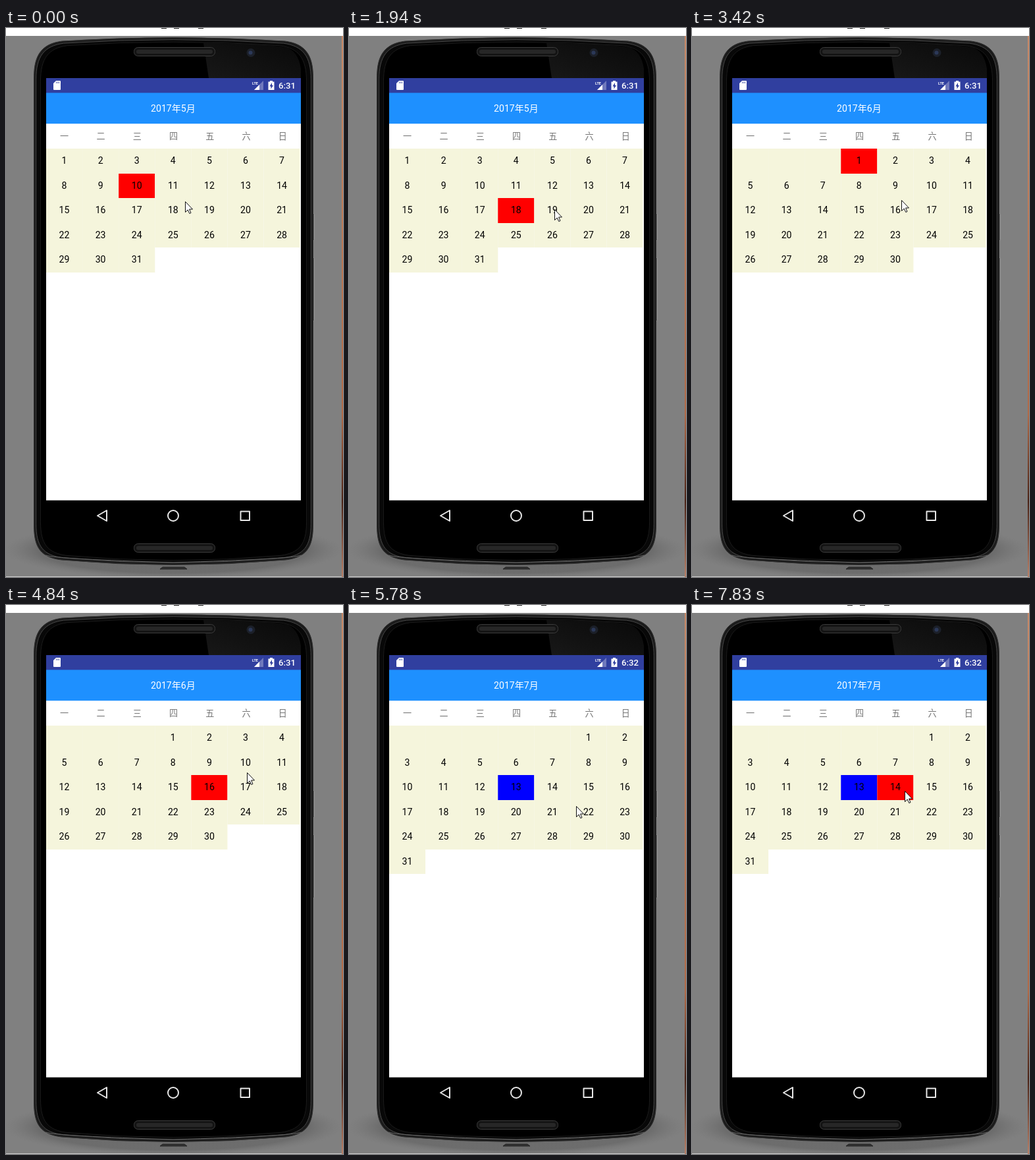
These frames come from a looping animation (512x833 px, 8 s). An HTML page:

```html
<!DOCTYPE html>
<html lang="zh-CN">
<head>
<meta charset="utf-8">
<title>Calendar</title>
<style>
  html, body { margin: 0; width: 100%; height: 100%; overflow: hidden; background: #808080; }
  svg { display: block; }
  text { font-family: Roboto, "Noto Sans CJK SC", "Noto Sans CJK", sans-serif; text-anchor: middle; }
  .day { font-size: 14.1px; fill: #000; }
  .week { font-size: 13.1px; fill: #757575; }
  .title { font-size: 14.1px; fill: #fff; }
  .clock { font-size: 13.2px; font-weight: 500; fill: #fff; }
  .lte { font-size: 5.5px; font-weight: 700; fill: #fff; }
</style>
</head>
<body>
<svg id="stage" width="512" height="833" viewBox="0 0 512 833">
  <defs>
    <path id="body" d="M42.5 75C42.5 40 55 24 85 20Q254 9 424 20C454 24 466.5 40 466.5 75V755C466.5 790 455 803 425 807Q254 822 84 807C54 803 42.5 790 42.5 755Z"/>
    <radialGradient id="shade">
      <stop offset=".8" stop-color="#555" stop-opacity=".45"/>
      <stop offset="1" stop-color="#707070" stop-opacity="0"/>
    </radialGradient>
    <linearGradient id="gloss" x1="0" x2="1" y1="1" y2="0">
      <stop offset="0" stop-color="#2b2b2b"/>
      <stop offset="1" stop-color="#111"/>
    </linearGradient>
    <linearGradient id="edge" x2="0" y2="1">
      <stop offset="0" stop-color="#c98a68"/>
      <stop offset=".7" stop-color="#b06a48"/>
      <stop offset=".86" stop-color="#4a2418"/>
      <stop offset="1" stop-color="#b98068"/>
    </linearGradient>
    <g id="speaker">
      <rect x="194.5" y=".5" width="123" height="13" rx="6" fill="#141414" stroke="#3c3c3c"/>
      <rect x="198" y="4" width="116" height="6" rx="3" fill="#272727"/>
    </g>
  </defs>

  <!-- backdrop -->
  <rect width="512" height="833" fill="#808080"/>
  <rect width="512" height="12" fill="#fff"/>
  <path d="M236 .5h8M255 .5h8M292 .5h8" stroke="#222"/>
  <ellipse cx="254" cy="792" rx="258" ry="44" fill="url(#shade)"/>
  <rect y="832" width="512" height="1" fill="#ccc"/>
  <rect x="510" y="12" width="2" height="821" fill="url(#edge)"/>

  <!-- phone -->
  <g fill="#555" stroke="#9a9a9a">
    <rect x="465.5" y="281.5" width="3" height="41" rx="1"/>
    <rect x="465.5" y="348.5" width="3" height="96" rx="1"/>
  </g>
  <use href="#body" fill="#1b1b1b" stroke="#303030"/>
  <use href="#body" fill="#080808" stroke="#484848" transform="translate(254.5 414.5) scale(.985 .992) translate(-254.5 -414.5)"/>
  <use href="#body" fill="#000" stroke="#1c1c1c" transform="translate(254.5 414.5) scale(.953 .983) translate(-254.5 -414.5)"/>
  <path d="M60 800Q80 806 254 811Q430 806 449 800" fill="none" stroke="#666"/>
  <path d="M300 23Q390 24 424 29Q444 34 448 62V76H308Z" fill="url(#gloss)" opacity=".55"/>
  <path d="M234 821l4-3h33l4 3z" fill="#333" stroke="#222"/>
  <use href="#speaker" y="29"/>
  <use href="#speaker" y="782"/>
  <circle cx="372" cy="37.5" r="6.5" fill="#1c2029"/>
  <circle cx="371.5" cy="37.5" r="3" fill="#2b3858"/>

  <!-- screen -->
  <rect x="61" y="76" width="387" height="640.7" fill="#fff"/>
  <rect x="61" y="76" width="387" height="23" fill="#303f9f"/>
  <rect x="61" y="98.4" width="387" height="46.8" fill="#1e90ff"/>
  <path d="M76 80h6q1 0 1 1v12q0 1-1 1h-9q-1 0-1-1v-9z" fill="#fff"/>
  <path d="M76.5 81.500v2.500M78.500 81.500v2.500M80.500 81.500v2.500" stroke="#303f9f" stroke-width=".8"/>
  <path d="M391 80v14h-14z" fill="#7079bc"/>
  <path d="M385 86v8h-8z" fill="#fff"/>
  <text class="lte" x="378.5" y="86">LTE</text>
  <path d="M401 80h4v1.5h2.5V94h-9V81.5h2.5z" fill="#fff"/>
  <path d="M404 83l-3.5 5.5h2V92.5l3.5-5.5h-2z" fill="#303f9f"/>
  <text class="clock" id="clock" x="427" y="92"></text>
  <text class="title" id="title" x="254" y="127"></text>
  <g id="week"></g>
  <svg x="61" y="183" width="387" height="534" overflow="hidden"><g id="pages"></g></svg>

  <!-- navigation -->
  <g fill="none" stroke="#e6e6e6" stroke-width="2" stroke-linejoin="round">
    <path d="M139 740L153 732V748Z"/>
    <circle cx="254" cy="740" r="8"/>
    <rect x="356.5" y="733.5" width="13.5" height="13.5"/>
  </g>

  <path id="cursor" d="M.5 .5V16.5L4.2 13L6.8 18.5L9 17.5L6.6 12H11.5Z" fill="#fff" stroke="#111"/>
</svg>
<script>
const LOOP = 8000, STEP = 130, PAGE = 387, CELL_W = 55.09, CELL_H = 37.5;
const RED = "#f00", BLUE = "#00f", BEIGE = "#f5f5dc";
const $ = id => document.getElementById(id);

const linear = p => p, easeIn = p => p * p, easeOut = p => 1 - (1 - p) ** 3;
const move = (start, end, to, ease = linear) => ({ start, end, to, ease });

const pointer = [
  move(0, 0, [272, 263]),
  move(140, 270, [255, 263]),
  move(540, 780, [356, 233]),
  move(930, 1050, [296, 245]),
  move(1200, 1200, [254, 274]),
  move(1940, 1940, [312, 275]),
  move(2090, 2610, [123, 279]),
  move(2870, 3150, [351, 264]),
  move(3300, 3420, [318, 261]),
  move(4290, 4440, [308, 280]),
  move(4720, 4840, [366, 254]),
  move(4990, 5270, [117, 290]),
  move(5410, 5780, [345, 305]),
  move(6360, 6600, [263, 87]),
  move(6750, 6870, [215, 137]),
  move(7020, 7270, [344, 305]),
  move(7420, 7550, [323, 282])
];

// Each swipe is a drag that speeds up, then a settling onto the next page.
const scroll = [
  move(0, 0, [0]),
  move(2090, 2750, [318], easeIn),
  move(2870, 3150, [PAGE], easeOut),
  move(4990, 5270, [PAGE + 239], easeIn),
  move(5410, 5780, [PAGE * 2], easeOut)
];

const months = [
  { blanks: 0, days: 31, before: 10, after: 18, tap: 1510 },
  { blanks: 3, days: 30, before: 1, after: 16, tap: 4290 },
  { blanks: 5, days: 31, today: 13, after: 14, tap: 7830 }
];

function along(moves, time) {
  const i = moves.findLastIndex(m => m.start <= time);
  const { start, end, to, ease } = moves[i];
  const gaps = Math.round((end - start) / STEP);
  if (time >= end) return to;
  const step = Math.floor((time - start) / (end - start) * gaps) + 1;
  const part = ease(step / (gaps + 1));
  return moves[i - 1].to.map((from, k) => Math.round(from + (to[k] - from) * part));
}

function add(parent, tag, attrs, content = "") {
  const el = document.createElementNS("http://www.w3.org/2000/svg", tag);
  for (const key in attrs) el.setAttribute(key, attrs[key]);
  el.textContent = content;
  return parent.appendChild(el);
}

[..."一二三四五六日"].forEach((name, i) =>
  add($("week"), "text", { class: "week", x: 61 + PAGE / 7 * (i + .5), y: 169 }, name));

months.forEach((month, index) => {
  const page = add($("pages"), "g", { transform: `translate(${index * PAGE})` });
  month.cells = [];
  for (let i = 0; i < month.blanks + month.days; i++) {
    const x = i % 7 * CELL_W, row = Math.floor(i / 7);
    const y = Math.round(row * CELL_H), bottom = Math.round((row + 1) * CELL_H);
    const day = i - month.blanks + 1;
    const box = add(page, "rect", { x, y, width: CELL_W, height: bottom - y, fill: BEIGE });
    if (day < 1) continue;
    add(page, "text", { class: "day", x: x + CELL_W / 2, y: row * CELL_H + 23 }, day);
    month.cells.push({ day, box });
  }
});

function draw(time) {
  for (const { cells, before, after, tap, today } of months) {
    const chosen = time < tap ? before : after;
    for (const { day, box } of cells)
      box.setAttribute("fill", day === chosen ? RED : day === today ? BLUE : BEIGE);
  }
  const [offset] = along(scroll, time);
  $("pages").setAttribute("transform", `translate(${-offset})`);
  $("cursor").setAttribute("transform", `translate(${along(pointer, time)})`);
  $("title").textContent = `2017年${5 + Math.floor(offset / PAGE + .4)}月`;
  $("clock").textContent = time < 5530 ? "6:31" : "6:32";
}

const start = performance.now();
function tick() {
  draw((performance.now() - start) % LOOP);
  requestAnimationFrame(tick);
}
tick();
</script>
</body>
</html>
```
